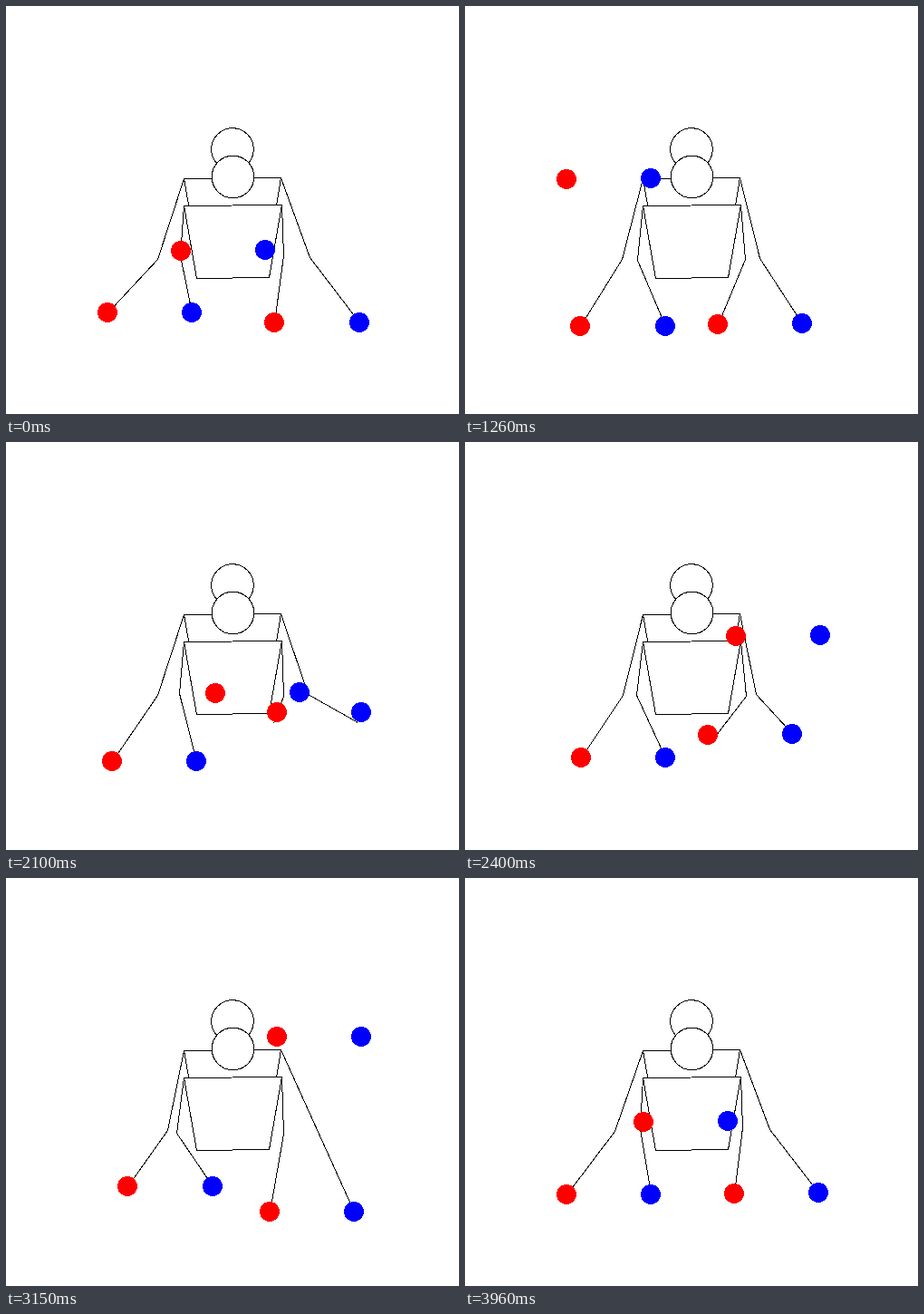
Animation, 500 px wide and 450 px high, one loop 3.99 s. Source, as an HTML page:

```html
<!DOCTYPE html>
<html lang="en">
<head>
<meta charset="utf-8">
<title>Shared juggling</title>
<style>
  html, body { margin: 0; width: 100%; height: 100%; overflow: hidden; background: #fff; }
  svg { display: block; width: 500px; height: 450px; }
  .body { fill: #fff; stroke: #000; stroke-width: 1; }
  .arm { fill: none; stroke: #000; stroke-width: 1; }
</style>
</head>
<body>
<svg id="stage" viewBox="0 0 500 450" shape-rendering="crispEdges"></svg>
<script>
const LOOP = 3.99, STEP = 0.03, BEAT = LOOP / 6;
const AIR3 = 1.7 * BEAT, AIR4 = 2.7 * BEAT;
const G = 436.8;                       // px / s²
const OUT = 112, IN = 135.5, MID = 205.7, BASE = 338.6;
const BLUE_DX = 93.3, TILT = 0.006;

// Body scale: px per cm sideways, upwards and towards the viewer
const KX = 2.35, KZ = 1.78, KY = 1.535, ARM = 41;

// Left hand at its throws and catches: time, x, vx, vy (height is always BASE)
const KEYS = [
  [0, OUT, 0, -392],
  [0.7 * BEAT, IN, -69, 138],
  [2 * BEAT, IN, 123, -247],
  [2.7 * BEAT, OUT, 0, 90],
  [4 * BEAT, IN, 16, -42],
  [4.7 * BEAT, IN, -22, 80],
  [LOOP, OUT, 0, -392]
];

const wrap = t => ((t % LOOP) + LOOP) % LOOP;
const mirror = ([x, y]) => [2 * MID - x, y];

function leftHand(time) {
  const t = wrap(time);
  let i = 0;
  while (i < KEYS.length - 2 && t >= KEYS[i + 1][0]) i++;
  const [t0, x0, vx0, vy0] = KEYS[i], [t1, x1, vx1, vy1] = KEYS[i + 1];
  const d = t1 - t0, u = (t - t0) / d;
  const ease = u * u * (3 - 2 * u);
  const a = d * u * (1 - u) ** 2, b = d * u * u * (u - 1);
  return [x0 + (x1 - x0) * ease + a * vx0 + b * vx1, BASE + a * vy0 + b * vy1];
}
const rightHand = t => mirror(leftHand(t - LOOP / 2));

const flight = (t, air, from, to) =>
  [from + (to - from) * t / air, BASE - G / 2 * t * (air - t)];

// Stays with the left hand: one high throw, then a long hold
function highBall(time) {
  const t = wrap(time);
  return t < AIR4 ? flight(t, AIR4, OUT, OUT) : leftHand(t);
}

// Crosses between the hands; half a loop is one throw and one hold
function crossBall(time) {
  const t = wrap(time - 2 * BEAT), half = LOOP / 2;
  const s = t % half;
  const p = s < AIR3 ? flight(s, AIR3, IN, 2 * MID - IN) : rightHand(s + 2 * BEAT);
  return t < half ? p : mirror(p);
}

const place = ([x, y], dx) => {
  const px = x + dx;
  return [px, y - TILT * (px - OUT)];
};

// Two equal arm bones in space with the elbow hanging down
function armPoints([sx, sy], [hx, hy], reach) {
  const dx = (hx - sx) / KX, dz = -(hy - sy - reach * KY) / KZ;
  const dist = Math.hypot(dx, reach, dz);
  const pts = [[sx, sy]];
  if (dist <= 2 * ARM) {
    const bend = Math.sqrt(ARM * ARM - dist * dist / 4);
    const slope = Math.asin(dz / dist);
    const f = 0.5 * (1 + bend * Math.tan(slope) / (dist / 2));
    const drop = bend * Math.cos(slope) - dz / 2;
    pts.push([sx + dx * f * KX, sy + reach * f * KY + drop * KZ]);
  }
  pts.push([hx, hy]);
  return pts;
}

const stage = document.getElementById('stage');
function add(tag, attrs) {
  const el = document.createElementNS('http://www.w3.org/2000/svg', tag);
  for (const k in attrs) el.setAttribute(k, attrs[k]);
  return stage.appendChild(el);
}
const pixel = v => Math.floor(v) + 0.5;
const list = pts => pts.map(p => p.map(pixel).join()).join(' ');

function addBody(y, right, cx, cy) {
  add('polygon', { class: 'body', points: list([[196, y], [right, y - 1], [290, y + 79], [210, y + 80]]) });
  add('circle', { class: 'body', cx, cy, r: 23.3 });
}
addBody(190, 303, 250, 158);
addBody(220, 304, 250.5, 188.5);

const arms = [
  { shoulder: [196, 190], reach: 50.5, hand: leftHand, dx: 0 },
  { shoulder: [303, 189], reach: 50.5, hand: rightHand, dx: BLUE_DX },
  { shoulder: [196, 220], reach: 30.7, hand: leftHand, dx: BLUE_DX },
  { shoulder: [304, 219], reach: 30.7, hand: rightHand, dx: 0 }
];
for (const a of arms) a.el = add('polyline', { class: 'arm' });

const paths = [highBall, crossBall, t => mirror(highBall(t - LOOP / 2))];
const balls = [];
for (const [fill, dx] of [['#f00', 0], ['#00f', BLUE_DX]])
  for (const path of paths)
    balls.push({ path, dx, el: add('circle', { r: 11, fill }) });

function draw(t) {
  for (const a of arms)
    a.el.setAttribute('points', list(armPoints(a.shoulder, place(a.hand(t), a.dx), a.reach)));
  for (const b of balls) {
    const [x, y] = place(b.path(t), b.dx);
    b.el.setAttribute('cx', Math.floor(x));
    b.el.setAttribute('cy', Math.floor(y));
  }
}

const start = performance.now();
function tick() {
  const t = Math.max(0, performance.now() - start) / 1000 % LOOP;
  draw(Math.floor(t / STEP + 1e-6) * STEP);
  requestAnimationFrame(tick);
}
draw(0);
requestAnimationFrame(tick);
</script>
</body>
</html>
```
